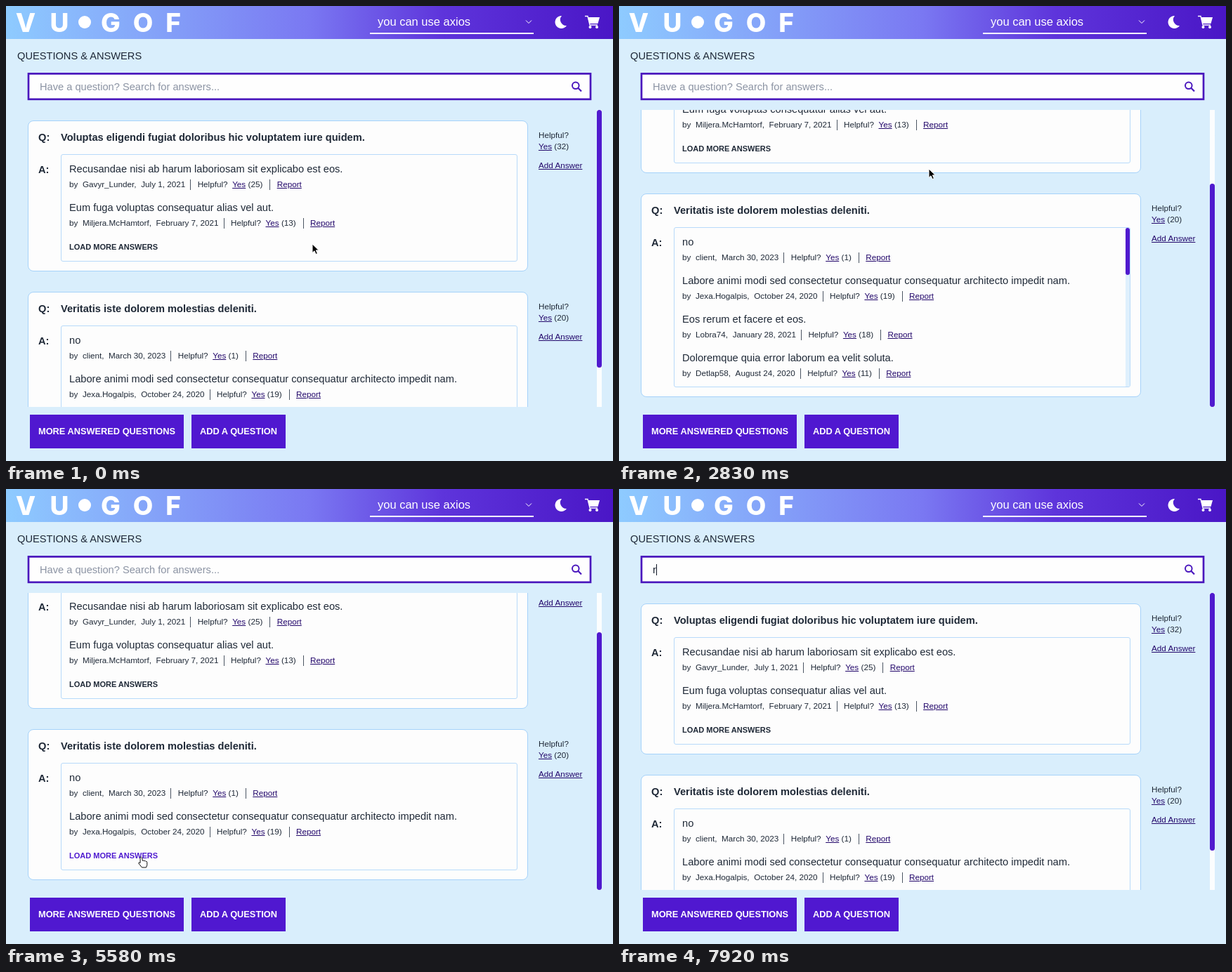
Recreate the animation shown at these times as an HTML page. Size 864 px wide and 648 px high, loop 8000 ms.

```html
<!DOCTYPE html>
<html lang="en">
<head>
<meta charset="utf-8">
<title>Questions &amp; Answers</title>
<style>
* { box-sizing: border-box; margin: 0; }
html, body { width: 100%; height: 100%; overflow: hidden; }
body { position: relative; background: #d9eefc; color: #1f2937;
  font: 14.64px/20px "Liberation Sans", Arial, sans-serif; white-space: nowrap; }
header, svg, .abs, .card, .box, .side, .bar, .bar i { position: absolute; }
header { left: 0; top: 0; width: 864px; height: 47px;
  background: linear-gradient(90deg, #8ecbff, #7a78f2 50%, #5e34db 72%, #4a16c6); }
svg { left: 0; top: 0; }
u { color: #23086b; }
#field { left: 48px; top: 105px; }
#caret { left: 52px; top: 107px; width: 1px; height: 16px; background: #111827; }
#view { left: 0; top: 148px; width: 864px; height: 423px; overflow: hidden; }
.card { left: 31px; width: 712px; height: 215px; background: #fdfdfd; border: 1px solid #a5d2fa; border-radius: 8px; }
.card.open { height: 290px; }
.box { left: 46px; top: 47px; width: 650px; height: 153px; border: 1px solid #b7dafa; border-radius: 3px; overflow: hidden; }
.open .box { height: 228px; }
.row { height: 55px; padding: 10px 0 0 11px; }
.row:nth-child(n+3) { display: none; }
.open .row { display: block; }
.meta, .side { font-size: 11.7px; }
.meta { display: flex; align-items: center; height: 14px; margin-top: 5px; }
.meta span, .meta u { margin-left: 6.6px; }
.meta em { margin-left: 3.3px; font-style: normal; }
.meta i { width: 1px; height: 15px; margin: 0 2.8px 0 7px; background: #4b5563; }
.meta em + i { margin-left: 10px; }
.more { padding-left: 11px; font: bold 11px/42px "Liberation Sans", Arial, sans-serif; }
.side { left: 758px; line-height: 16.5px; }
.side p + p { margin-top: 10.5px; }
.bar i { left: 0; width: 100%; background: #501ace; border-radius: 4px; }
.button { top: 582px; height: 48px; background: #5018d0; color: #fff; text-align: center;
  font: bold 12.8px/48px "Liberation Sans", Arial, sans-serif; }
</style>
</head>
<body>
<header>
  <svg width="864" height="47" fill="#fff">
    <g font-family="Inter, sans-serif" font-weight="800" font-size="37" text-anchor="middle">
      <text x="28" y="36.5">V</text><text x="76" y="36.5">U</text>
      <text x="149" y="36.5">G</text><text x="195" y="36.5">O</text><text x="238" y="36.5">F</text>
    </g>
    <circle cx="112" cy="23" r="9"/>
    <text x="529" y="27.5" font-size="16.5">you can use axios</text>
    <path d="M518 38h233v2H518zM791 14a9 9 0 1 0 7 14a8.5 8.5 0 0 1-7-14z"/>
    <path d="M740 20.5l4 4 4-4" fill="none" stroke="#fff"/>
    <path d="M824 14.5h4l3 12.5h11" fill="none" stroke="#fff" stroke-width="1.3"/>
    <path d="M828 16h17l-2.5 9h-12z"/>
    <circle cx="831.5" cy="30" r="2"/><circle cx="841" cy="30" r="2"/>
  </svg>
</header>
<div class="abs" style="left:16px;top:61px">QUESTIONS &amp; ANSWERS</div>
<svg width="864" height="140" fill="none" stroke="#4a17bd" stroke-width="2">
  <rect x="32" y="96.4" width="800" height="36.4" fill="#fefefe" stroke-width="2.7"/>
  <circle cx="810.8" cy="113.3" r="4.8"/><path d="M814.3 116.8l4.7 4.7" stroke-width="2.2"/>
</svg>
<div class="abs" id="field"></div>
<div class="abs" id="caret"></div>
<div class="abs" id="view">
  <div class="abs" id="list"></div>
  <div class="bar" style="left:841px;top:0;width:7px;height:423px;background:#fbfdfe"><i id="thumb"></i></div>
</div>
<div class="abs button" style="left:34px;width:219px">MORE ANSWERED QUESTIONS</div>
<div class="abs button" style="left:264px;width:134px">ADD A QUESTION</div>
<svg width="864" height="648">
  <path id="arrow" d="M0 0v12.5l3-2.7 2.1 4.7 2.3-1-2.1-4.6h4z" fill="#000" stroke="#fff"/>
  <path id="ibeam" d="M-3-7q3 0 3 2q0-2 3-2M0-5V5M-3 7q3 0 3-2q0 2 3 2M-1.5 1h3" fill="none" stroke="#222" stroke-width="1.2"/>
  <path id="hand" d="M-1 1q1.5-2 2.5 0l1 4.5q1.5-1.2 2.3.3q1.6-1 2.2.6q1.7-.4 1.8 1.3v4l-1.3 3.3h-6l-4.8-6q0-2 2.4-.6z"
    fill="#fff" stroke="#111"/>
</svg>
<script>
const LOOP = 8000, STEP = 1000 / 12, VIEW = 423;
const OPENED = 1450, COLLAPSED = 5100, FOCUSED = 7280, TYPED = 7850;
const $ = id => document.getElementById(id);

const questions = [
  { top: 15, helpful: 32, text: 'Voluptas eligendi fugiat doloribus hic voluptatem iure quidem.', answers: [
    ['Recusandae nisi ab harum laboriosam sit explicabo est eos.', 'Gavyr_Lunder', 'July 1, 2021', 25],
    ['Eum fuga voluptas consequatur alias vel aut.', 'Miljera.McHamtorf', 'February 7, 2021', 13]] },
  { top: 259, helpful: 20, text: 'Veritatis iste dolorem molestias deleniti.', answers: [
    ['no', 'client', 'March 30, 2023', 1],
    ['Labore animi modi sed consectetur consequatur consequatur architecto impedit nam.', 'Jexa.Hogalpis', 'October 24, 2020', 19],
    ['Eos rerum et facere et eos.', 'Lobra74', 'January 28, 2021', 18],
    ['Doloremque quia error laborum ea velit soluta.', 'Detlap58', 'August 24, 2020', 11],
    ['Unde ut similique quis voluptatem ipsum corrupti repudiandae.', 'Jomali.Morlip46', 'April 24, 2021', 10],
    ['Est illum quo dolorem beatae possimus fuga consequatur.', 'Nyvade27', 'July 31, 2021', 10],
    ['Quia dolor incidunt ut perferendis.', 'Jupegas_Kuvaz', 'December 27, 2020', 8],
    ['Deserunt praesentium quia ut praesentium neque id consequatur soluta.', 'Mumbomad.Entarbo', 'April 24, 2021', 7],
    ['Omnis sed aut quidem voluptas.', 'Pelvota62', 'March 3, 2021', 6],
    ['Et rerum dolores nihil quia tempora.', 'Tarbu.Ondelk', 'May 18, 2021', 5],
    ['Quos autem laboriosam est.', 'Wimola15', 'June 9, 2021', 3],
    ['Aut molestiae sit officia magnam.', 'Rudopa_Kelm', 'January 2, 2021', 2],
    ['Sint natus ut voluptatem.', 'Fenoby80', 'October 6, 2020', 1]] },
];

const answerRow = ([text, name, date, votes]) => `<div class="row"><p>${text}</p><div class="meta">by
  <span>${name},</span><span>${date}</span><i></i><span>Helpful?</span><u>Yes</u><em>(${votes})</em><i></i><u>Report</u></div></div>`;

$('list').innerHTML = questions.map(q => `
  <div class="card" style="top:${q.top}px">
    <b class="abs" style="left:14px;top:13px">Q:</b><b class="abs" style="left:46px;top:13px">${q.text}</b>
    <b class="abs" style="left:14px;top:59px">A:</b>
    <div class="box"><div class="answers">${q.answers.map(answerRow).join('')}<div class="more">LOAD MORE ANSWERS</div></div>
      <div class="bar" style="right:0;top:0;width:6px;height:226px;background:#dff0fd"><i></i></div></div>
  </div>
  <div class="side" style="top:${q.top + 12.5}px"><p>Helpful?<br><u>Yes</u> (${q.helpful})</p><p><u>Add Answer</u></p></div>`).join('');

const [firstCard, card] = document.querySelectorAll('.card');
firstCard.querySelector('.bar').style.display = 'none';
const answers = card.querySelector('.answers'), more = card.querySelector('.more'), innerBar = card.querySelector('.bar');

// Pointer stops: time, x, y, and the shape used from then on
const stops = [
  [0, 436, 339, 'arrow'], [650, 436, 339, 'arrow'], [1250, 192, 523, 'hand'], [OPENED, 192, 523, 'ibeam'],
  [1650, 197, 521, 'ibeam'], [1800, 197, 521, 'arrow'], [2400, 441, 232, 'arrow'], [2850, 441, 232, 'arrow'],
  [3300, 430, 386, 'ibeam'], [4350, 430, 386, 'arrow'], [4850, 192, 524, 'hand'], [5650, 192, 524, 'arrow'],
  [6100, 290, 380, 'arrow'], [6450, 300, 330, 'arrow'], [6800, 337, 184, 'ibeam'], [6900, 337, 184, 'ibeam'],
  [7200, 300, 115, 'ibeam'], [TYPED, 300, 115, 'none'], [LOOP, 300, 115, 'none'],
];

function ease(t, start, end) {
  const p = Math.min(1, Math.max(0, (t - start) / (end - start)));
  return p * p * (3 - 2 * p);
}

function pointerAt(t) {
  const i = stops.findIndex((s, n) => n && t < s[0]) - 1;
  const [t0, x0, y0, kind] = stops[i], [t1, x1, y1] = stops[i + 1], p = ease(t, t0, t1);
  return { x: x0 + (x1 - x0) * p, y: y0 + (y1 - y0) * p, kind };
}

function setThumb(thumb, track, content, scroll) {
  thumb.style.height = track * track / content + 'px';
  thumb.style.top = scroll * track / content + 'px';
}

function draw(t) {
  const open = t >= OPENED && t < COLLAPSED;
  card.classList.toggle('open', open);
  innerBar.style.display = open ? 'block' : 'none';

  const content = open ? 563 : 488;
  const wanted = 65 * ease(t, 250, 850) + 75 * ease(t, 2420, 2780);
  const scroll = Math.round(Math.min(content - VIEW, wanted) * (1 - ease(t, 5850, 6500)));
  $('list').style.transform = `translateY(${-scroll}px)`;
  setThumb($('thumb'), VIEW, content, scroll);

  const inner = open ? Math.round(207 * ease(t, 3320, 3660) + 324 * ease(t, 3740, 4300)) : 0;
  answers.style.transform = `translateY(${-inner}px)`;
  setThumb(innerBar.firstChild, 226, 757, inner);

  const { x, y, kind } = pointerAt(t);
  for (const name of ['arrow', 'ibeam', 'hand']) {
    $(name).style.display = name === kind ? '' : 'none';
    $(name).setAttribute('transform', `translate(${x} ${y})`);
  }
  more.textContent = open ? 'COLLAPSE ANSWERS' : 'LOAD MORE ANSWERS';
  more.style.color = kind === 'hand' ? '#4f1ad0' : '';

  const typed = t >= TYPED;
  $('field').textContent = typed ? 'r' : 'Have a question? Search for answers...';
  $('field').style.color = typed ? '#1f2937' : '#8b93a3';
  $('caret').style.display = t >= FOCUSED ? '' : 'none';
  $('caret').style.left = typed ? '53px' : '48px';
}

function tick() {
  const t = performance.now() % LOOP;
  draw(Math.floor((t + 5) / STEP) * STEP % LOOP);
  requestAnimationFrame(tick);
}
tick();
</script>
</body>
</html>
```
